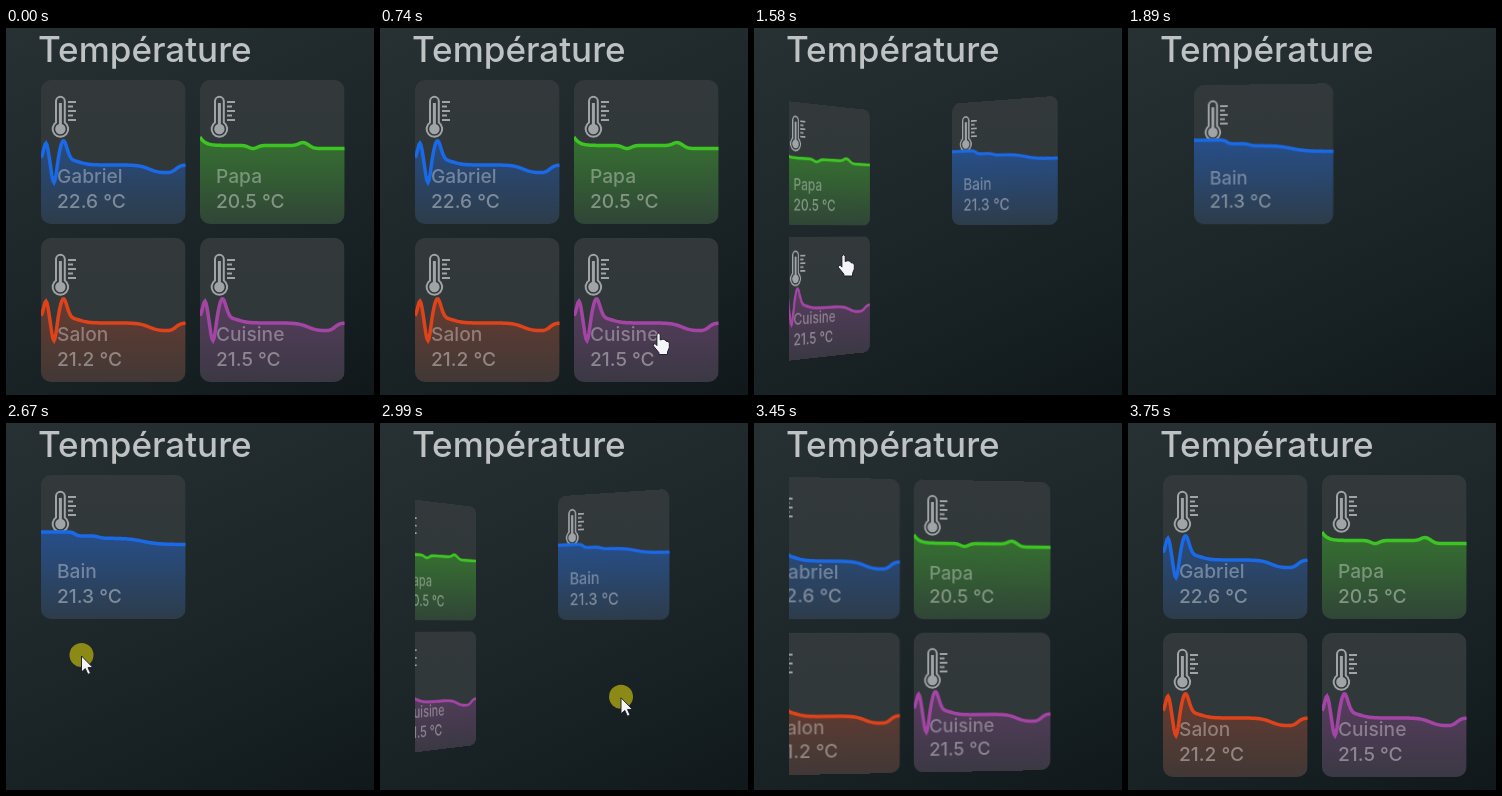
An HTML page for the animation above (4290 ms loop, 368 by 367 pixels).

```html
<!DOCTYPE html>
<html lang="fr">
<head>
<meta charset="utf-8">
<title>Température</title>
<style>
  html, body { margin: 0; width: 100%; height: 100%; overflow: hidden; }
  body {
    position: relative;
    background: linear-gradient(155deg, #273134 0%, #222c2f 25%, #1b2528 58%, #10181b 100%);
    font-family: Inter, Roboto, sans-serif;
  }
  h1 {
    position: absolute; left: 32px; top: 0; margin: 0;
    font-size: 35px; font-weight: 500; line-height: 43px; color: #bfc2c3;
  }
  #view {
    position: absolute; left: 35px; top: 52px; width: 304px; height: 302px;
    overflow: hidden; perspective: 1200px;
  }
  .page { position: absolute; left: 0; top: 0; }
  .page text { font-size: 19.2px; font-weight: 500; fill: #fff; }
  #top { position: absolute; left: 0; top: 0; }
  #arrow, #hand { fill: #f4f4fa; stroke: #15191c; stroke-width: .9; }
</style>
</head>
<body>
<h1>Température</h1>
<div id="view"></div>
<svg id="top" width="368" height="367">
  <g id="cursor">
    <circle id="press" r="12" cy="-1" fill="#8c8a17"/>
    <path id="arrow" d="M0 0V16L3.8 12.6L6.4 18.4L9 17.2L6.5 11.6H11.4Z"/>
    <path id="hand" transform="translate(1 -1)"
      d="M-1.6 1.4Q0 -.8 1.7 1.4V7Q6 5 7.8 8.4Q10.6 7.6 10.8 10.6V14.5L9 19V21.5H.4V19.6L-5.2 12.8Q-5.6 10.2 -3.2 10.8L-1.6 12.6Z"/>
  </g>
</svg>
<script>
const LOOP = 4290, TICK = 77, FIRST = 420;
const WIDTH = 304, STRIDE = 324, ANGLE = 80, DEPTH = 300;
const CARD_W = 144.5, CARD_H = 144;
const $ = id => document.getElementById(id);

// Temperature histories: bumps and smooth steps around a level.
const bump = (x, at, w) => Math.exp(-(((x - at) / w) ** 2));
const step = (x, at, w) => 1 / (1 + Math.exp((at - x) / w));
const wave = x => 79 - 16 * bump(x, 5, 3.2) + 24 * bump(x, 13, 3.6) - 18.5 * bump(x, 22.5, 5)
  + 6 * step(x, 38, 5) + 8 * step(x, 108, 5) - 8 * step(x, 135, 2.5);
const calm = x => 65.5 - 8.5 * Math.exp(-x / 5) + 3 * bump(x, 53, 6)
  - 3 * bump(x, 103, 6) + 3 * step(x, 111, 2);
const fall = x => 57 + 4 * step(x, 34, 1.5) + 2.2 * step(x, 58, 2) + 6.3 * step(x, 102, 8);

function curve(f) {
  const pts = [];
  for (let x = 0; x <= 145; x++) pts.push(`${x} ${f(x).toFixed(2)}`);
  return 'M' + pts.join('L');
}

function ticks() {
  let d = '';
  for (let i = 0; i < 5; i++) d += `M27 ${22 + 4.5 * i}h${i % 2 ? 5 : 8}`;
  return d;
}

const thermometer = `<g fill="none" stroke="#a0a4a6" stroke-width="2">
  <path d="M15 42.5V21.2a4.4 4.4 0 0 1 8.8 0V42.5a7.8 7.8 0 1 1 -8.8 0Z"/>
  <path d="M19.4 23V46" stroke-width="3"/>
  <circle cx="19.4" cy="49" r="5.2" fill="#a0a4a6" stroke="none"/>
  <path d="${ticks()}"/></g>`;

function card(col, row, name, value, color, f, alpha) {
  const id = name.toLowerCase(), line = curve(f);
  return `<g transform="translate(${col * 159} ${row * 158})" clip-path="url(#round)">
    <linearGradient id="${id}" x2="0" y2="1">
      <stop stop-color="${color}" stop-opacity="${alpha}"/>
      <stop offset="1" stop-color="${color}" stop-opacity=".1"/>
    </linearGradient>
    <rect width="${CARD_W}" height="${CARD_H}" fill="url(#glass)"/>
    <path d="${line}V${CARD_H}H0Z" fill="url(#${id})"/>
    ${thermometer}
    <path d="${line}" fill="none" stroke="${color}" stroke-width="3.5"/>
    <text x="16" y="103" opacity=".34">${name}</text>
    <text x="16" y="127.5" opacity=".39">${value} °C</text>
  </g>`;
}

const page = cards => `<svg class="page" width="${WIDTH}" height="302">${cards}</svg>`;
const defs = `<defs>
  <clipPath id="round"><rect width="${CARD_W}" height="${CARD_H}" rx="10"/></clipPath>
  <linearGradient id="glass" x2="0" y2="1">
    <stop stop-color="#33393b"/><stop offset="1" stop-color="#2f3739"/>
  </linearGradient></defs>`;

$('view').innerHTML = page(defs
  + card(0, 0, 'Gabriel', '22.6', '#1a69e6', wave, .4)
  + card(1, 0, 'Papa', '20.5', '#3cc422', calm, .41)
  + card(0, 1, 'Salon', '21.2', '#e0431a', wave, .3)
  + card(1, 1, 'Cuisine', '21.5', '#a445a6', wave, .34))
  + page(card(0, 0, 'Bain', '21.3', '#1a69e6', fall, .46));
const pages = document.querySelectorAll('.page');

// Smooth interpolation that never overshoots its keys.
function track(keys, axis = 1) {
  const n = keys.length - 1;
  const rate = i => (keys[i + 1][axis] - keys[i][axis]) / (keys[i + 1][0] - keys[i][0]);
  const slope = keys.map((_, i) => {
    if (!i || i === n) return 0;
    const a = rate(i - 1), b = rate(i);
    return a * b <= 0 ? 0 : 2 * a * b / (a + b);
  });
  return t => {
    if (t <= keys[0][0]) return keys[0][axis];
    if (t >= keys[n][0]) return keys[n][axis];
    const i = keys.findIndex(k => k[0] > t) - 1, p = keys[i], q = keys[i + 1];
    const h = q[0] - p[0], u = (t - p[0]) / h, v = 1 - u;
    return p[axis] * (1 + 2 * u) * v * v + q[axis] * (1 + 2 * v) * u * u
      + h * u * v * (slope[i] * v - slope[i + 1] * u);
  };
}

const scroll = track([[1036, 0], [1190, 23.5], [1575, 187.5], [1883, 298], [2250, STRIDE],
  [2653, STRIDE], [3038, 168], [3192, 102], [3660, 0]]);
const path = [[420, 252, 362], [1036, 303, 250], [1190, 271, 250], [1575, 88.5, 227.5],
  [1806, -30, 218], [2114, 62, 338], [2653, 75.5, 233], [3192, 344, 302]];
const curX = track(path), curY = track(path, 2);
const within = (t, a, b) => t >= a && t < b;
const show = (el, on) => el.setAttribute('visibility', on ? 'visible' : 'hidden');

function draw(ms) {
  // The picture advances in fixed ticks.
  const t = FIRST + TICK * Math.floor((ms - FIRST) / TICK);
  const s = scroll(t);
  pages.forEach((el, i) => {
    const m = (s - i * STRIDE) / WIDTH;
    el.style.transform = Math.abs(m) < .001 ? 'none'
      : `translate3d(${-m * WIDTH}px,0,${-DEPTH * Math.abs(m)}px) rotateY(${ANGLE * m}deg)`;
  });
  const y = curY(t), seen = within(t, 420, 1806) || within(t, 2114, 3260);
  const hand = t < 2000 && y < 354;
  $('cursor').setAttribute('transform', `translate(${curX(t)} ${y})`);
  show($('hand'), seen && hand);
  show($('arrow'), seen && !hand);
  show($('press'), within(t, 1080, 1500) || within(t, 2640, 3120));
}

const start = performance.now();
function loop() {
  draw((performance.now() - start) % LOOP);
  requestAnimationFrame(loop);
}
loop();
</script>
</body>
</html>
```
